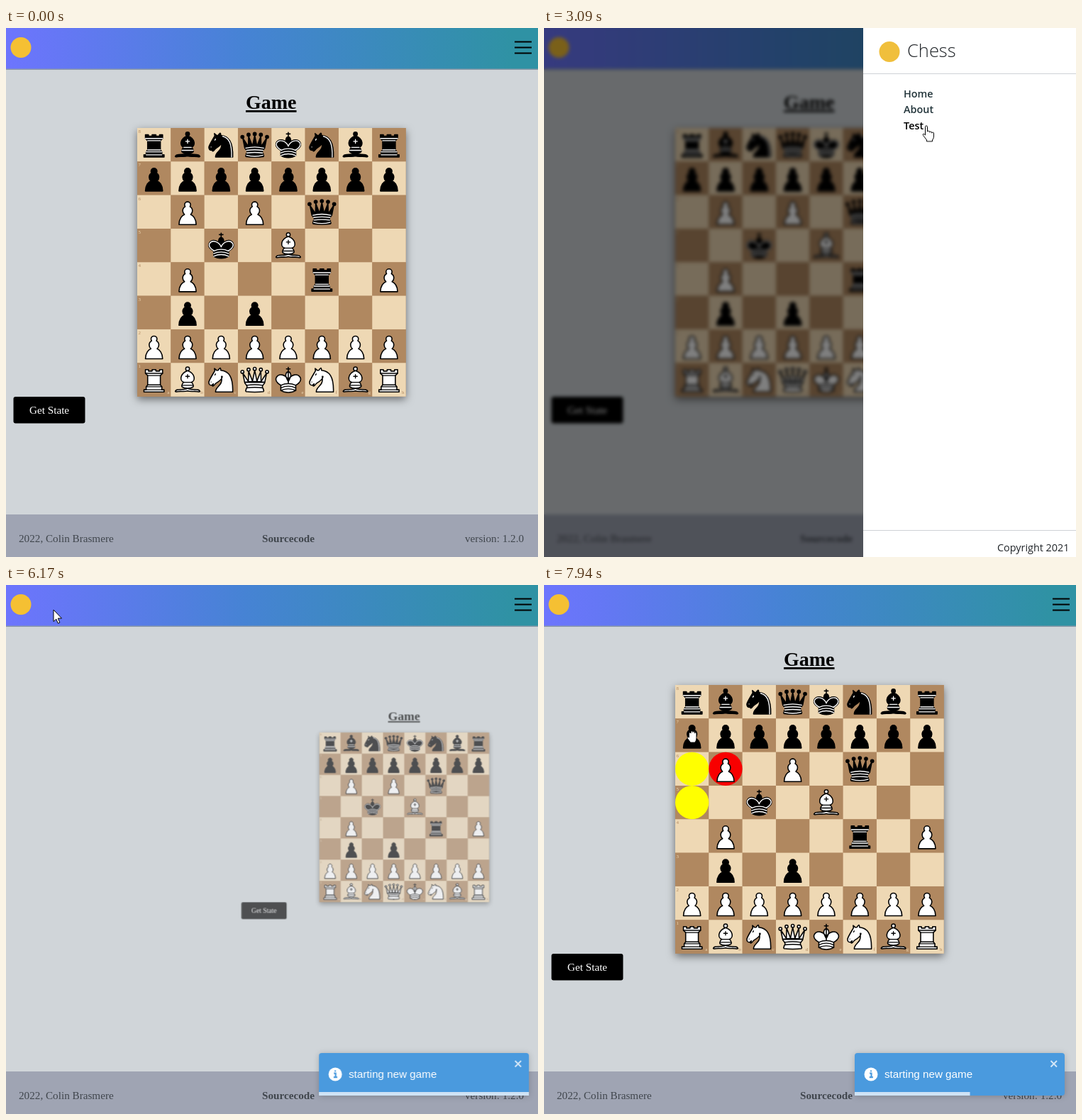
These frames come from a looping animation (750 by 746 pixels, 8 s). An HTML page:

```html
<!DOCTYPE html>
<html lang="en">
<head>
<meta charset="utf-8">
<title>Chess</title>
<style>
html, body { margin: 0; width: 100%; height: 100%; overflow: hidden; background: #d0d5d9; }
svg, #shade { position: absolute; left: 0; top: 0; width: 750px; height: 746px; overflow: hidden; }
#shade { background: rgba(0, 0, 0, .5); backdrop-filter: blur(2.6px); opacity: 0; }
text { font: 15.2px "Liberation Serif", "Times New Roman", serif; white-space: pre; }
#page {
  transform-origin: 375px 323px;
  transform: translateX(calc((1 - var(--size)) * var(--side) * 507px)) scale(var(--size));
  opacity: var(--size);
}
#title { font-size: 28px; font-weight: bold; text-decoration: underline; }
#frame { filter: drop-shadow(0 4px 6px rgba(0, 0, 0, .5)); }
.coord { font-size: 7px; }
.foot { fill: #40464d; }
.bold { font-weight: bold; }
#drawer text { font: 14.4px "Open Sans", "Noto Sans", sans-serif; fill: #212529; }
#drawer .brand { font-size: 25.5px; font-weight: 300; }
#drawer .link { font-weight: 600; fill: #22343a; }
#toast text { font: 15.2px "Liberation Sans", Arial, sans-serif; fill: #fff; }
#toast { filter: drop-shadow(0 1px 4px rgba(0, 0, 0, .2)); }
#bar { transform-origin: 438px 0; }
#cursor path { fill: #fff; stroke: #000; stroke-linejoin: round; }
</style>
</head>
<body>
<svg viewBox="0 0 750 746">
  <defs>
    <linearGradient id="sky">
      <stop offset="0" stop-color="#6d75fd"/>
      <stop offset=".1" stop-color="#6577f5"/>
      <stop offset=".45" stop-color="#4683d4"/>
      <stop offset=".95" stop-color="#2f92a4"/>
    </linearGradient>
  </defs>
  <rect width="750" height="746" fill="#d0d5d9"/>
  <rect y="57" width="750" height="2" fill="#8d9aa8"/>
  <rect width="750" height="57.5" fill="url(#sky)"/>
  <circle cx="21" cy="27.5" r="14.5" fill="#f5c033"/>
  <path d="M717 19.5h24m0 8h-24m0 8h24" fill="none" stroke="#000" stroke-width="1.8"/>
  <rect y="686" width="750" height="60" fill="#9fa4b3"/>
  <text class="foot" x="18" y="725">2022, Colin Brasmere</text>
  <text class="foot bold" x="361" y="725">Sourcecode</text>
  <text class="foot" x="647" y="725">version: 1.2.0</text>
  <g id="page">
    <text id="title" x="338" y="114">Game</text>
    <rect id="frame" x="185" y="141" width="378.6" height="378.6" fill="#b08860"/>
    <g id="board" transform="translate(185 141)"></g>
    <rect x="10.5" y="520" width="101" height="37.5" rx="3"/>
    <text x="33" y="543.5" fill="#fff">Get State</text>
  </g>
</svg>
<div id="shade"></div>
<svg viewBox="0 0 750 746">
  <g id="drawer">
    <rect width="310" height="746" fill="#fff"/>
    <path d="M0 64.5h310M0 708.5h310" stroke="#ced2d6"/>
    <circle cx="37" cy="33.5" r="14.5" fill="#f0bf3c"/>
    <text class="brand" x="62" y="41">Chess</text>
    <text class="link" x="57" y="97.5">Home</text>
    <text class="link" x="57" y="120.3">About</text>
    <text class="link" x="57" y="143">Test</text>
    <text x="189" y="737.5">Copyright 2021</text>
  </g>
  <g id="toast">
    <rect x="438" y="660" width="296" height="60" rx="4" fill="#4a9ade"/>
    <circle cx="461" cy="690" r="9.5" fill="#fff"/>
    <path d="M459 688.5h2.5v5.5M458.8 694.2h5M461 684.6v1.6" fill="none" stroke="#4a9ade" stroke-width="2.2"/>
    <text x="480" y="695">starting new game</text>
    <path d="M714.5 671l8.5 8.5m0-8.5l-8.5 8.5" stroke="#d3e6f7" stroke-width="1.9"/>
    <rect id="bar" x="438" y="715" width="296" height="5" fill="#cfe3f5"/>
  </g>
  <g id="cursor">
    <path d="M0 0V16.5L3.8 13 6.3 19 8.8 18 6.3 12H11.5z"/>
    <path d="M-1.5 13V1.5a1.5 1.5 0 0 1 3 0V8q3-2 3 1 3-2 3 1 3-2 3 1v4q0 3-2 5v2H.5v-2l-5-6.5q-1-2 .8-2.2z"/>
    <path d="M-4.5 2V-4q1.3-2 2.6 0v-2q1.3-2 2.6 0v.5q1.3-2 2.6 0V-4q1.3-2 2.6 0V3q0 3-2 6H-2.5l-4-5.5q-1-2 .5-2.5z" stroke-width=".8"/>
  </g>
</svg>
<script>
const T = 8000, CELL = 378.6 / 8;
const $ = id => document.getElementById(id);

// Pieces live on a 45-unit square; all but the knight are a left half plus its mirror image
function mirror(cmd, spec) {
  const half = spec.split(' ').map(p => p.split(',').map(Number));
  const flip = half.map(([x, y]) => [45 - x, y]).reverse();
  const [first, ...rest] = [...flip, ...half.slice(half[0][0] == 22.5 ? 1 : 0)];
  return `M${first}${cmd}${rest.join(' ')}z`;
}
const dot = (x, y, r) => `M${x - r} ${y}a${r} ${r} 0 1 0 ${2 * r} 0a${r} ${r} 0 1 0 ${-2 * r} 0z`;
const band = (x, y, rise = 0) => `M${x} ${y}Q22.5 ${y - rise} ${45 - x} ${y}`;

const PIECES = {
  p: { body: mirror('C', '22.5,9 20.3,9 18.5,10.8 18.5,13 18.5,13.9 18.8,14.7 19.3,15.4 17.3,16.5 16,18.6 16,21 16,23 16.9,24.8 18.4,26 15.4,27 11,31.6 11,39.5'), line: '' },
  r: {
    body: mirror('L', '20,9 20,11 15,11 15,9 11,9 11,14 14,17 14,29.5 12,32 12,36 9,36 9,39'),
    line: band(11, 14) + band(14, 17) + band(14, 29.5) + band(12, 32) + band(12, 36)
  },
  n: {
    body: 'M22 10C32.5 11 38.5 18 38 39H15C15 30 25 32.5 23 18M24 18C24.4 21 18.5 25.4 16 27 13 29 13.2 31.3 11 31L12 28 10 30C8 30 6 30 6 26 6 24 12 14 12 14L14 10.5 13.5 7.5 16.5 10h2S19.3 8 21 7Q22 7 22 10',
    line: 'M9 25.5h.01M14.9 14.8l-.8 1.4', dark: 'M24.6 11.2C33 13.2 37 20.5 36.4 39'
  },
  b: {
    body: mirror('C', '22.5,34 19,36.4 12.4,35 9,36 9,36 7.4,36 6,38 6.7,39 7.6,39 9,38.5 12.4,37.5 19,39 22.5,37.5')
      + mirror('C', '22.5,10.5 11.5,14.5 12,24.5 17.5,26 17.5,26 15,27.5 15,30 15,30 14.5,30.5 15,32 17,34 20,34 22.5,34')
      + dot(22.5, 8, 2.5),
    line: band(17.5, 26) + band(15, 30) + band(20, 18) + 'M22.5 15.5v5'
  },
  q: {
    body: mirror('L', '22.5,10 19.5,24.5 14.3,11 14,25 6.5,13.5 9,26')
      + mirror('C', '22.5,25 18,25 13,25.3 9,26 9,28 10.5,28 11.5,30 12.5,31.5 12.5,31 12,33.5 10.5,34.5 11,36 11,36 9.5,37.5 11,38.5 11,38.5 14.5,39 18,39.2 22.5,39.2')
      + [-2, -1, 0, 1, 2].map(i => dot(22.5 + 8.25 * i, 8 + i * i, 2)).join(''),
    line: band(11.5, 30, 1.6) + band(12, 33.5, 1.5), dark: band(10.5, 27, 3) + band(11.5, 36.5, -3)
  },
  k: {
    body: mirror('C', '22.5,25 22.5,25 18,17.5 19.5,14.5 19.5,14.5 20.5,12 22.5,12')
      + mirror('C', '22.5,23.5 20,16 10.5,13 6.5,19.5 3.5,25.5 12.5,30 12.5,30 12.5,32 12.5,35 12.5,37 15.5,39 19,39.6 22.5,39.6')
      + 'M22.5 27V6M20 8h5',
    line: [30, 33.5, 37].map(y => band(12.5, y, 4.5)).join(''),
    dark: mirror('C', '22.5,24.5 20,18 10.9,14 7,19.9 4.5,25.5 13,29.5 13,29.5').slice(0, -1)
  }
};

function piece(c, x, y) {
  const kind = PIECES[c.toLowerCase()], white = c < 'a';
  const inner = kind.line + (white ? '' : kind.dark || '');
  return `<g transform="translate(${x} ${y}) scale(${CELL / 45})" stroke-width="1.5" stroke-linecap="round" stroke-linejoin="round">
    <path d="${kind.body}" fill="${white ? '#fff' : '#000'}" stroke="#000"/>
    <path d="${inner}" fill="none" stroke="${white ? '#000' : '#fff'}" stroke-width="1.3"/></g>`;
}

const LIGHT = '#eed8b4', DARK = '#b08860';
const SETUP = ['rbnqknbr', 'pppppppp', '.P.P.q..', '..k.B...', '.P...r.P', '.p.p....', 'PPPPPPPP', 'RBNQKNBR'];

function buildBoard() {
  let squares = '', pieces = '';
  SETUP.forEach((row, r) => [...row].forEach((c, f) => {
    const x = f * CELL, y = r * CELL, odd = (r + f) % 2;
    const ink = odd ? LIGHT : DARK;
    squares += `<rect x="${x}" y="${y}" width="${CELL + .1}" height="${CELL + .1}" fill="${odd ? DARK : LIGHT}"/>`;
    if (!f) squares += `<text class="coord" x="1.5" y="${y + 7}" fill="${ink}">${8 - r}</text>`;
    if (r == 7) squares += `<text class="coord" x="${x + CELL - 2}" y="${y + CELL - 4}" text-anchor="end" fill="${ink}">${'abcdefgh'[f]}</text>`;
    if (c != '.') pieces += piece(c, x, y);
  }));
  const mark = (f, r, fill) => `<circle cx="${(f + .5) * CELL}" cy="${(r + .5) * CELL}" r="${CELL / 2}" fill="${fill}"/>`;
  const moves = mark(0, 2, '#ff0') + mark(0, 3, '#ff0') + mark(1, 2, '#f80000');
  $('board').innerHTML = squares + `<g id="moves">${moves}</g>` + pieces;
}
buildBoard();

// Rows are [time, properties, easing to the next row]
function play(el, rows) {
  const frames = rows.map(([t, props, easing = 'linear']) => ({ offset: t / T, easing, ...props }));
  if (rows[0][0] > 0) frames.unshift({ ...frames[0], offset: 0, easing: 'linear' });
  if (rows[rows.length - 1][0] < T) frames.push({ ...frames[frames.length - 1], offset: 1 });
  el.animate(frames, { duration: T, iterations: Infinity });
}
// Flips a property between two values at the given times
function toggle(el, prop, off, on, times) {
  play(el, [0, ...times].map((t, i) => [t, { [prop]: i % 2 ? on : off }, 'step-end']));
}
const move = (x, y = 0) => ({ transform: `translate(${x}px, ${y}px)` });

// Pointer trips: start, end and where it comes to rest
const TRIPS = [
  [240, 450, 698, 331], [730, 1480, 729, 23], [1850, 2370, 539, 139], [2370, 2560, 548, 239],
  [2830, 3090, 539, 138], [3090, 3360, 528, 97], [3690, 4090, 534, 88],
  [5760, 6170, 67, 35], [6580, 6640, 93, 46], [6640, 7650, 209, 213]
];
let rest = move(706, 679);
play($('cursor'), TRIPS.flatMap(([start, end, x, y]) => {
  const from = rest;
  rest = move(x, y);
  return [[start, from], [end, rest]];
}));
const [arrow, hand, grab] = $('cursor').children;
toggle(arrow, 'opacity', 0, 1, [240, 2320, 2430, 3060, 4900, 7400]);
toggle(hand, 'opacity', 0, 1, [2320, 2430, 3060, 4900]);
toggle(grab, 'opacity', 0, 1, [7400]);

// Menu drawer
play($('drawer'), [
  [1607, move(750), 'ease'], [2089, move(450)], [4899, move(450), 'step-end'], [4900, move(750)]
]);
play($('shade'), [
  [1600, { opacity: 0 }], [1670, { opacity: 1 }], [4899, { opacity: 1 }, 'step-end'], [4900, { opacity: 0 }]
]);
const hovers = [[3290, 4900], [3180, 3290], [2320, 2430, 3060, 3180]];
document.querySelectorAll('.link').forEach((el, i) => toggle(el, 'fill', '#22343a', '#000', hovers[i]));

// Page shrinks away to the left and grows back from the right; plain numbers keep it sharp while scaling
for (const name of ['--size', '--side'])
  CSS.registerProperty({ name, syntax: '<number>', inherits: false, initialValue: 1 });
const pose = (side, size) => ({ '--side': side, '--size': size });
play($('page'), [
  [5760, pose(-1, 1), 'ease-in'], [5943, pose(-1, 0), 'step-end'], [5944, pose(1, 0), 'ease'], [6564, pose(1, 1)]
]);

// Toast bounces in, then its bar runs down
const swings = [3000, -25, 10, -5, 0];
play($('toast'), swings.map((x, i) =>
  [5675 + (i && 337.5 + 112.5 * i), move(x), 'cubic-bezier(.215, .61, .355, 1)']));
play($('bar'), [[6545, { transform: 'scaleX(1)' }], [T, { transform: 'scaleX(.53)' }]]);
toggle($('moves'), 'opacity', 0, 1, [7560]);
</script>
</body>
</html>
```
